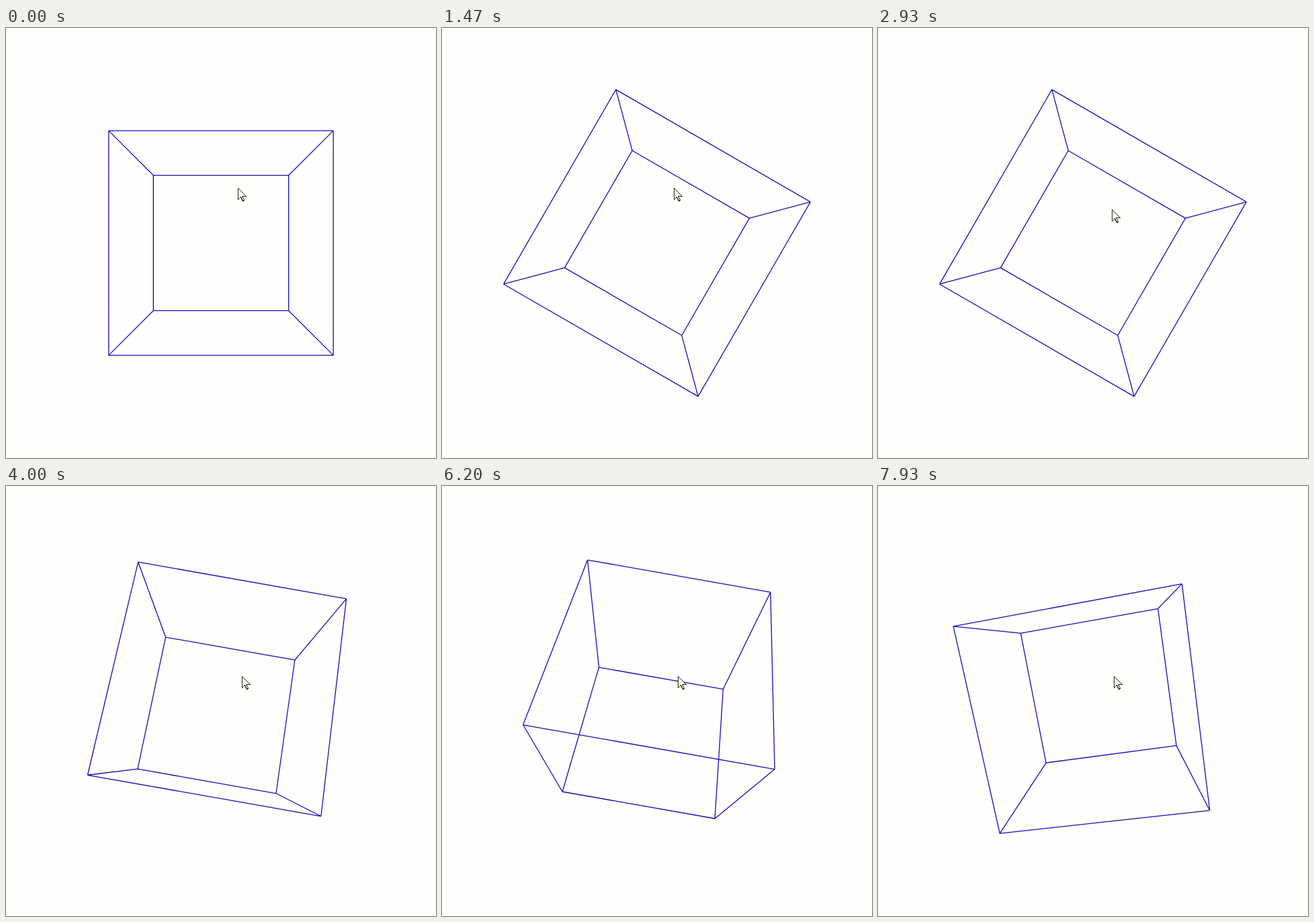
Animation, 640 px wide and 640 px high, one loop 8000 ms. Source, as an HTML page:

```html
<!DOCTYPE html>
<html lang="en">
<head>
<meta charset="utf-8">
<title>Turning wireframe cube</title>
<style>
html, body { margin: 0; width: 100%; height: 100%; overflow: hidden; background: #fefefc; }
svg { display: block; width: 100%; height: 100%; }
#cube { fill: none; stroke: #140cb8; stroke-width: 1.3; }
#pointer { fill: #fefefc; stroke: #26260c; stroke-width: 1; shape-rendering: crispEdges; }
</style>
</head>
<body>
<svg viewBox="0 0 640 640">
  <path id="cube"/>
  <path id="pointer" d="M.5 .5V17.5L4.5 13.5L7.5 19.5L9.5 18.5L7 12.5H12.5Z"/>
</svg>
<script>
const LOOP = 8000, TICK = 1000 / 15;
const FOCAL = 506.5, DISTANCE = 4.03, CENTER = 320;
const cube = document.getElementById('cube');
const pointer = document.getElementById('pointer');

// Each turn: axis, degrees, time in ticks. Turns follow the cube's own axes.
const turns = [];
function addTurns(axis, degrees, count, start, gap) {
  for (let i = 0; i < count; i++) turns.push([axis, degrees, start + i * gap]);
}
addTurns('z', -10, 17, 7, 2.6);
addTurns('x', -10, 12, 59.8, 2.8);
addTurns('x', -10, 3, 94, 1);
addTurns('z', -10, 2, 97, 1);
addTurns('z', 10, 3, 100, 1);
addTurns('x', -10, 2, 103, 7);
addTurns('z', 10, 1, 117.9, 1);

// Pointer path: time in ticks, x, y.
const path = [
  [0, 345, 238], [29, 345, 238], [33, 346, 50], [34, 346, 50],
  [38, 348, 270], [50, 348, 270], [54, 351, 283], [120, 351, 283]
];

const corners = [];
for (let i = 0; i < 8; i++) corners.push([1, 2, 4].map(bit => i & bit ? 1 : -1));
const edges = [];
for (let i = 0; i < 8; i++)
  for (const bit of [1, 2, 4]) if (!(i & bit)) edges.push([i, i | bit]);

function rotate([x, y, z], [axis, degrees]) {
  const a = degrees * Math.PI / 180, c = Math.cos(a), s = Math.sin(a);
  return axis === 'z' ? [x * c - y * s, x * s + y * c, z]
                      : [x, y * c - z * s, y * s + z * c];
}

function project([x, y, z]) {
  const scale = FOCAL / (DISTANCE - z);
  return [x, y].map(v => (CENTER + v * scale).toFixed(2)).join(' ');
}

function pointerAt(tick) {
  const i = path.findIndex(p => p[0] > tick);
  const [t0, x0, y0] = path[i - 1], [t1, x1, y1] = path[i];
  const k = (tick - t0) / (t1 - t0);
  return [x0 + (x1 - x0) * k, y0 + (y1 - y0) * k].map(Math.round);
}

function draw(now) {
  const tick = (now % LOOP) / TICK;
  const done = turns.filter(turn => turn[2] <= tick);
  const points = corners.map(p => project(done.reduceRight(rotate, p)));
  cube.setAttribute('d', edges.map(([a, b]) => `M${points[a]}L${points[b]}`).join(''));
  pointer.setAttribute('transform', `translate(${pointerAt(tick)})`);
}

const start = performance.now();
function loop() {
  draw(performance.now() - start);
  requestAnimationFrame(loop);
}
loop();
</script>
</body>
</html>
```
